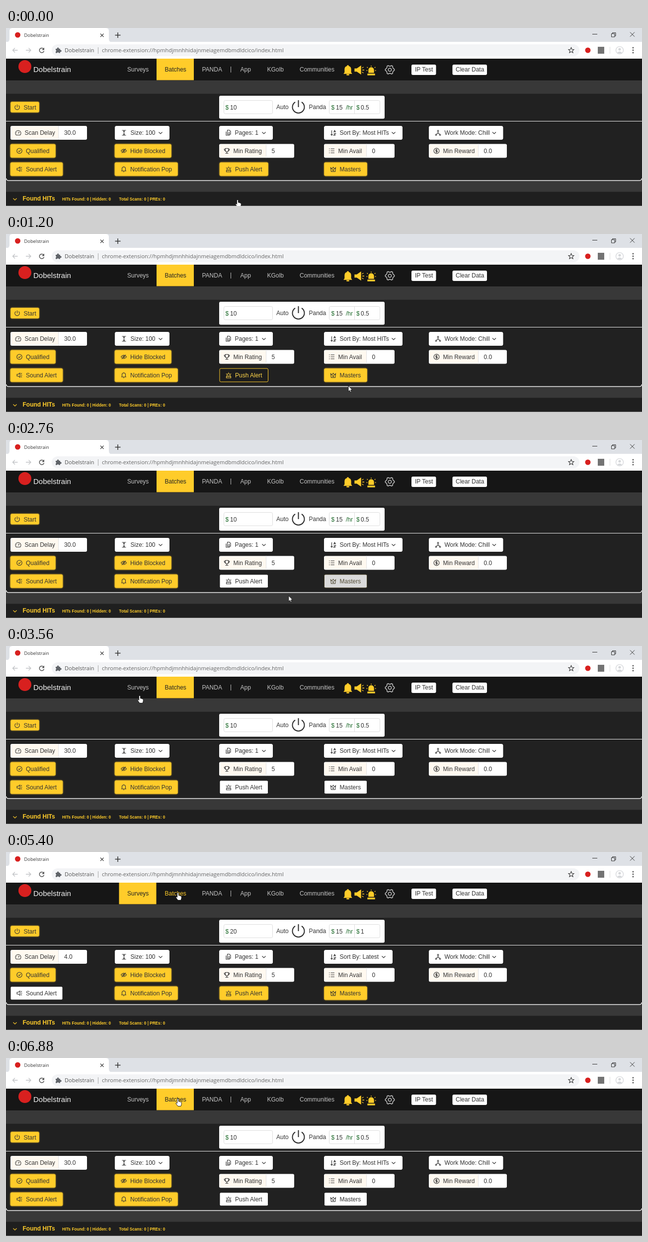
An HTML page for the animation above (6920 ms loop, 1280 by 360 pixels).

```html
<!DOCTYPE html>
<html lang="en">
<head>
<meta charset="utf-8">
<title>Dobelstrain</title>
<style>
html, body { margin: 0; width: 100%; height: 100%; overflow: hidden; background: #212121; }
svg { display: block; width: 100%; height: 100%; color: #333; font: 12px "Liberation Sans", Arial, sans-serif; }
text { fill: currentColor; stroke: none; white-space: pre; }
.icon { fill: none; stroke: currentColor; stroke-width: 1.1; }
.solid { fill: #ffcc2a; stroke: #ffcc2a; stroke-width: 1.3; }
.ui { font-family: "Open Sans", "Noto Sans", sans-serif; }
.btn { fill: #fff; stroke: #fff; }
.on { fill: #ffcc2a; stroke: #e0b229; filter: drop-shadow(0 0 1.5px #ffcc2a90); }
.green { color: #1f6b2c; }
.gray { color: #c4c4c4; }
.gold { color: #ffcc2a; font-weight: bold; }

.push, .masters, .sound, .tab, .values, .cursor, .cursor * { animation: 6920ms ease infinite; }
.push { animation-name: push; }
.masters { animation-name: masters; }
.sound { animation-name: sound; }
.surveys-tab { animation-name: surveys-tab; }
.batches-tab { animation-name: batches-tab; }
.values { animation-timing-function: step-end; }
.batches { animation-name: batches; }
.surveys { animation-name: surveys; }
.cursor { animation-name: travel; animation-timing-function: ease-in-out; }
.cursor * { animation-timing-function: step-end; }
.hand { animation-name: hand; }
.arrow { animation-name: arrow; }

@keyframes push {
  0%, 7.51%, 60.4%, 78.61% { fill: #ffcc2a; stroke: #e0b229; color: #333; filter: drop-shadow(0 0 1.5px #ffcc2a90); }
  11.85%, 22.54% { fill: #1d1d1d; stroke: #ffcc2a; color: #ffd54a; filter: drop-shadow(0 0 1.5px #ffcc2a00); }
  26.88%, 56.07%, 82.95%, 100% { fill: #fff; stroke: #212121; color: #333; filter: drop-shadow(0 0 1.5px #ffcc2a00); }
}
@keyframes masters {
  0%, 19.08%, 60.4%, 78.61% { fill: #ffcc2a; stroke: #e0b229; color: #333; filter: drop-shadow(0 0 1.5px #ffcc2a90); }
  23.41%, 37.57% { fill: #1d1d1d; stroke: #ffcc2a; color: #ffd54a; filter: drop-shadow(0 0 1.5px #ffcc2a00); }
  41.91%, 56.07%, 82.95%, 100% { fill: #fff; stroke: #212121; color: #333; filter: drop-shadow(0 0 1.5px #ffcc2a00); }
}
@keyframes sound {
  0%, 56.07%, 82.95%, 100% { fill: #ffcc2a; stroke: #e0b229; filter: drop-shadow(0 0 1.5px #ffcc2a90); }
  60.4%, 78.61% { fill: #fff; stroke: #212121; filter: drop-shadow(0 0 1.5px #ffcc2a00); }
}
@keyframes surveys-tab {
  0%, 56.07%, 82.95%, 100% { fill: #161616; color: #c4c4c4; }
  60%, 78.61% { fill: #ffcc2a; color: #222; }
}
@keyframes batches-tab {
  0%, 56.07%, 82.95%, 100% { fill: #ffcc2a; color: #222; }
  60.4%, 74% { fill: #161616; color: #c4c4c4; }
  75.5%, 78.61% { fill: #161616; color: #ffcc2a; }
}
@keyframes batches { 0%, 78.61% { opacity: 1; } 56.07% { opacity: 0; } }
@keyframes surveys { 0%, 78.61% { opacity: 0; } 56.07% { opacity: 1; } }
@keyframes travel {
  0%, 2.31% { transform: translate(466px, 347px); }
  8.09%, 12.72% { transform: translate(486px, 290px); }
  17.34% { transform: translate(689px, 307px); }
  20.23%, 24.57% { transform: translate(690px, 290px); }
  31.21% { transform: translate(602px, 335px); }
  33.5%, 38.15% { transform: translate(590px, 338px); }
  43.35% { transform: translate(500px, 240px); animation-timing-function: ease-out; }
  51.45% { transform: translate(269px, 100px); }
  54.34%, 67.05% { transform: translate(267px, 87px); }
  74.57%, 100% { transform: translate(346px, 82px); }
}
@keyframes hand {
  0%, 7.2%, 18.8%, 30.4%, 50.6%, 100% { opacity: 1; }
  3.8%, 13.3%, 26.3%, 39% { opacity: 0; }
}
@keyframes arrow {
  0%, 7.2%, 18.8%, 30.4%, 50.6%, 100% { opacity: 0; }
  3.8%, 13.3%, 26.3%, 39% { opacity: 1; }
}
</style>
</head>
<body>
<svg id="stage" viewBox="0 0 1280 360" preserveAspectRatio="none"></svg>
<script>
const ring = (x, y, r) => `M${x - r} ${y}a${r} ${r} 0 1 0 ${2 * r} 0a${r} ${r} 0 1 0 ${-2 * r} 0`;

const gear = 'M' + Array.from({ length: 24 }, (_, i) => {
  const angle = (i - 0.5) * Math.PI / 12, r = i % 4 < 2 ? 9.2 : 7.4;
  return `${(r * Math.cos(angle)).toFixed(1)} ${(r * Math.sin(angle)).toFixed(1)}`;
}).join('L') + 'Z' + ring(0, 0, 3.2);

const icons = {
  power: 'M-2.8-3.8a4.7 4.7 0 1 0 5.6 0M0-5.8V0',
  gauge: 'M-4 4.5A5.5 5.5 0 1 1 4 4.5ZM0 1L2.5-1.5M-3.5 0h1M0-3.5v1',
  height: 'M-4-5H4M-4 5H4M0-4V4M-1.5-2.5L0-4 1.5-2.5M-1.5 2.5L0 4 1.5 2.5',
  pages: 'M-4.5-2.5V5H2V3M-2-5.5H2L4.5-3V3H-2ZM0-1H3M0 1H3',
  sort: 'M-3-5V5M-5 3L-3 5-1 3M1-1L3-5 5-1M1.5-2H4.5M1 1.5H5L1 5H5',
  mode: 'M0-2.5V0L-3 3M0 0L3 3' + ring(0, -4, 1.3) + ring(-4, 4, 1.3) + ring(4, 4, 1.3),
  check: 'M-2.3 0L-.5 2 2.5-1.8' + ring(0, 0, 5.2),
  hide: 'M-5.5 0Q0-7 5.5 0Q0 7-5.5 0ZM-4 4.5L4-4.5' + ring(0, 0, 1.7),
  trophy: 'M-3-5H3V-1Q3 2 0 2T-3-1ZM-3-3.5H-5.3Q-5 0-2.8 0M3-3.5H5.3Q5 0 2.8 0M0 2V5M-3 5H3',
  list: 'M-5.5-4h1.5M-5.5 0h1.5M-5.5 4h1.5M-2-4H5.5M-2 0H5.5M-2 4H5.5',
  dollar: 'M2-1.8Q0-3.2-1.5-2T0 0 1.5 2-2 1.8M0-3.8V3.8' + ring(0, 0, 5.4),
  sound: 'M-5-1.8H-2.5L1-4.5V4.5L-2.5 1.8H-5ZM3 0H5.5M2.8-2.5L5-4M2.8 2.5L5 4',
  bell: 'M-5 3.5H5M-3.5 3.5V-1A3.5 3.5 0 0 1 3.5-1V3.5M0-4.5V-5.8M-1.2 5.3H1.2',
  siren: 'M-3 2.5V0A3 3 0 0 1 3 0V2.5M-4.5 2.5H4.5V5.5H-4.5ZM0-5.7V-4.3M-5-3L-3.8-2M5-3L3.8-2M0 .5V2.5',
  crown: 'M-5-3L-2.5-.5 0-4 2.5-.5 5-3 4 5H-4Z' + ring(0, 2, 1.2),
  chevron: 'M-3.5-1.5L0 2 3.5-1.5',
  puzzle: 'M-5-3H-2.2A1.9 1.9 0 1 1 1.4-3H4V-.4A1.9 1.9 0 1 1 4 3V5.5H1.2A1.8 1.8 0 0 0-2.2 5.5H-5V2.8A1.8 1.8 0 0 0-5-.6Z',
  star: 'M0-5.5L1.6-1.8 5.5-1.5 2.5 1.2 3.5 5 0 2.9-3.5 5-2.5 1.2-5.5-1.5-1.6-1.8Z',
  fullBell: 'M-7.5 7H7.5L6 5V-2A6 6 0 0 0 1-7.5V-9H-1V-7.5A6 6 0 0 0-6-2V5ZM-2 9H2V10H-2Z',
  fullHorn: 'M-9-2.5H-5L3-8V8L-5 2.5H-9ZM6 0h4M5.5-4l3-2M5.5 4l3 2',
  fullSiren: 'M-5 4V-1A5 5 0 0 1 5-1V4ZM-7 7H7V9H-7ZM0-10v2M-8.5-7l1.8 1.6M8.5-7l-1.8 1.6M-9.5 0h1.8M9.5 0h-1.8',
  gear,
};

const rect = (x, y, w, h, fill, extra = '') =>
  `<rect x="${x}" y="${y}" width="${w}" height="${h}"${fill ? ` fill="${fill}"` : ''} ${extra}/>`;
const text = (x, y, label, extra = '') => `<text x="${x}" y="${y}" ${extra}>${label}</text>`;
const icon = (x, y, name, extra = 'class="icon"') =>
  `<path transform="translate(${x} ${y})" d="${icons[name]}" ${extra}/>`;
const line = (d, color, width = 1.2) => `<path d="${d}" fill="none" stroke="${color}" stroke-width="${width}"/>`;
const dot = (x, y, r, fill) => `<circle cx="${x}" cy="${y}" r="${r}" fill="${fill}"/>`;
const group = (cls, ...parts) => `<g class="${cls}">${parts.join('')}</g>`;

const button = (x, y, w, name, label, cls = 'on') => group('btn ' + cls,
  rect(x + .5, y + .5, w - 1, 27, '', 'rx="2.5"'),
  icon(x + 18.5, y + 14, name), text(x + 31.5, y + 18, label));

const dropdown = (x, w, name, label) =>
  button(x, 198, w, name, label, '') + icon(x + w - 18, 212, 'chevron');

const field = (x, y, w, addon, name, label, value) =>
  rect(x, y, w, 28, '#fff', 'rx="3"') +
  rect(x + 1, y + 1, addon - 1, 26, '#fff9f0', 'rx="2"') +
  line(`M${x + addon + .5} ${y}v28`, '#e2e2e2', 1) +
  icon(x + 15.5, y + 14, name) + text(x + 28.5, y + 18, label) +
  (value ? text(x + addon + 11.5, y + 18, value) : '');

const tab = (x, label, cls) => group('tab ' + cls, rect(x, 62, 75, 43.5), text(x + 16.5, 88, label));

const modeValues = (cls, budget, reward, delay, sort, sortWidth) => group('values ' + cls,
  text(451, 164.5, budget), text(714, 164.5, reward), text(117, 216, delay),
  dropdown(640, sortWidth, 'sort', 'Sort By: ' + sort));

const browser = [
  rect(0, 0, 1280, 29, '#dee1e6'),
  '<path d="M0 29Q7 29 7 22V6Q7 0 13 0H201Q207 0 207 6V22Q207 29 214 29Z" fill="#fff"/>',
  rect(0, 28, 1280, 34, '#fff'),
  rect(92, 33, 1062, 24, '#f3f4f6', 'rx="12"'),
  dot(23.5, 14, 5.5, '#d8201f'),
  text(36.5, 18, 'Dobelstrain', 'class="ui" font-size="9.3"'),
  line('M190 11.5l6.5 6.5m0-6.5l-6.5 6.5', '#444'),
  line('M219.5 14.5h11M225 9v11', '#333', 1.5),
  line('M1180 12.5h10M1256 8.5l9 9m0-9l-9 9', '#333', 1),
  line('M1218.5 11.5h6.5v6.5h-6.5zM1220.5 11.5v-2h6.5v6.5h-2', '#333', 1),
  line('M23.5 45h-10m4.5-4.5L13.5 45l4.5 4.5M40 45h10m-4.5-4.5L50 45l-4.5 4.5', '#c2c4c7', 1.3),
  line('M75.5 42A4.7 4.7 0 1 0 76.5 46.5', '#555', 1.5),
  '<path d="M77 39.5v5h-5z" fill="#555"/>',
  icon(105, 45, 'puzzle', 'fill="#5f6368"'),
  text(118, 49, 'Dobelstrain', 'class="ui" font-size="11" style="color:#555"'),
  line('M185.5 39v13', '#aaa', 1),
  text(193, 49, 'chrome-extension://hpmhdjmnhhidajnmeiagemdbmdldcico/index.html', 'class="ui" font-size="11" style="color:#666"'),
  icon(1137.5, 45, 'star'),
  dot(1171, 45, 5.5, '#d8201f'),
  rect(1191, 38, 13, 14, '#737373'),
  line('M1215.5 38v14', '#ddd', 1),
  line(ring(1235, 45, 7.5), '#d0d2d6', 1.2),
  dot(1235, 43, 2.6, '#d5d7da'),
  '<path d="M1230 50q5-5 10 0q-5 3-10 0z" fill="#d5d7da"/>',
  ...[40, 45, 50].map(y => dot(1262, y, 1.4, '#555')),
];

const navigation = [
  rect(0, 62, 1280, 44.5, '#161616'),
  dot(38, 78, 13, '#d8201f'),
  text(55, 89, 'Dobelstrain', 'font-size="15" style="color:#f2f2f2"'),
  tab(227.5, 'Surveys', 'surveys-tab'),
  tab(303, 'Batches', 'batches-tab'),
  group('gray', text(394.5, 88, 'PANDA'), text(451, 87, '|'), text(471.5, 88, 'App'),
    text(525.5, 88, 'KGolb'), text(591, 88, 'Communities'), icon(772.5, 84.5, 'gear', 'class="icon" stroke-linejoin="round" style="stroke-width:1.5"')),
  icon(688, 85, 'fullBell', 'class="solid"'),
  icon(711, 85, 'fullHorn', 'class="solid"'),
  icon(735, 86, 'fullSiren', 'class="solid"'),
  rect(816, 74, 49.5, 21, '#fff', 'rx="3"'), text(823, 88, 'IP Test'),
  rect(898.5, 74, 69.5, 21, '#fff', 'rx="3"'), text(905, 88, 'Clear Data'),
];

const panels = [
  rect(0, 106, 1280, 27, '#383838'),
  rect(0, 133, 1280, 176, '#212121'),
  rect(0, 309, 1280, 22.5, '#383838'),
  rect(0, 331.5, 1280, 28.5, '#1f1f1f'),
  rect(0, 359, 1280, 1, '#666'),
  line('M0 188.5H1280', '#eee', 1),
  line('M.5 304Q.5 308.5 5 308.5H1275Q1279.5 308.5 1279.5 304', '#f2f2f2', 1.4),
  group('btn on', rect(9.5, 149.5, 57, 21, '', 'rx="2.5"'), icon(22.5, 160.5, 'power'), text(35.5, 164.5, 'Start')),
  rect(429, 137, 333, 46.5, '#fff', 'rx="3"'),
  rect(438.5, 146.5, 98, 27, 'none', 'rx="3" stroke="#ddd"'),
  rect(650.5, 146.5, 102, 27, 'none', 'rx="3" stroke="#ddd"'),
  line('M701.5 147v26', '#ddd', 1),
  group('green', text(441.5, 164.5, '$'), text(654.5, 164.5, '$'), text(684, 164.5, '/hr'), text(705, 164.5, '$')),
  text(544, 164, 'Auto'), text(609.5, 164, 'Panda'), text(664, 164.5, '15'),
  line('M582 149.8A12 12 0 1 0 595 149.8M588.5 146v14', '#2b2b2b', 2),
];

const controls = [
  field(9, 198, 154, 96, 'gauge', 'Scan Delay', ''),
  dropdown(219, 110, 'height', 'Size: 100'),
  dropdown(429, 108, 'pages', 'Pages: 1'),
  dropdown(851, 149.5, 'mode', 'Work Mode: Chill'),
  button(8.5, 234.5, 91.5, 'check', 'Qualified'),
  button(218.5, 234.5, 114.5, 'hide', 'Hide Blocked'),
  field(429, 234.5, 151, 94, 'trophy', 'Min Rating', '5'),
  field(640, 234.5, 142, 85, 'list', 'Min Avail', '0'),
  field(851, 234.5, 157, 99, 'dollar', 'Min Reward', '0.0'),
  button(8.5, 271.5, 106, 'sound', 'Sound Alert', 'sound'),
  button(218.5, 271.5, 127.5, 'bell', 'Notification Pop'),
  button(429.5, 271.5, 98.5, 'siren', 'Push Alert', 'push'),
  button(640, 271.5, 87, 'crown', 'Masters', 'masters'),
  modeValues('batches', '10', '0.5', '30.0', 'Most HITs', 158),
  modeValues('surveys', '20', '1', '4.0', 'Latest', 138),
];

const results = group('gold',
  icon(18, 346, 'chevron'),
  text(33.5, 348.5, 'Found HITs', 'font-size="12"'),
  text(113, 348.5, 'HITs Found: 0 | Hidden: 0', 'font-size="8.2"'),
  text(227.5, 348.5, 'Total Scans: 0 | PREs: 0', 'font-size="8.2"'));

const cursor = `<g class="cursor" fill="#fff" stroke="#111" stroke-width=".9">
  <path class="hand" d="M-1.4 1.2Q0-.8 1.4 1.2V6Q3 5.2 3.4 6.6Q5 5.9 5.4 7.2Q7 6.7 7.2 8.2V11.5L6 15.5H0L-4 10Q-4.2 8-2.4 8.6L-1.4 9.6Z"/>
  <path class="arrow" d="M0 0V11.5L2.6 9.2 4.3 13 6.2 12.2 4.6 8.5H8Z"/>
</g>`;

document.getElementById('stage').innerHTML =
  [...browser, ...navigation, ...panels, ...controls, results, cursor].join('');
</script>
</body>
</html>
```
